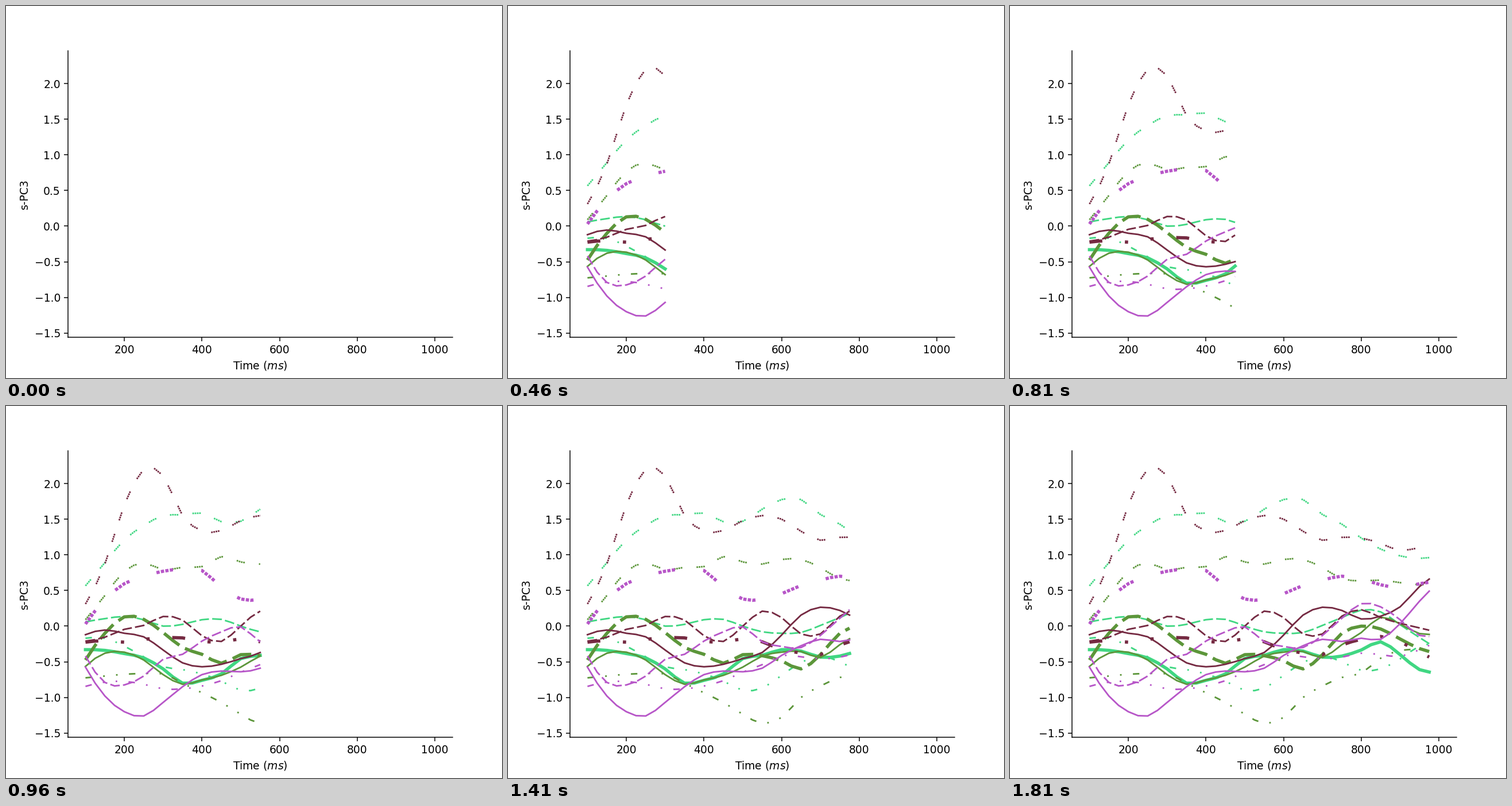
These frames come from a looping animation (864x648 px, 1860 ms). A matplotlib script:

```python
import matplotlib.pyplot as plt
import numpy as np
from matplotlib.animation import FuncAnimation

STEP = 10      # ms per animation tick
LOOP = 1860    # ms per loop
HOLD = 110     # empty axes before the first segment
GROW = 50      # ms between two samples

GREEN, OLIVE, MAROON, PURPLE = "#40d782", "#5c963a", "#752a42", "#b756c8"
SOLID = "-"
DASHED = (0, (6, 2))
DASHDOT = (0, (4, 7, 1, 7, 1, 7))
DOTTED = (0, (1, .4, 1, .4, 1, .4, 1, 8.8))

times = np.arange(100, 1001, 25)

fig, ax = plt.subplots(figsize=(6.4, 4.8), dpi=135)
ax.set_xlim(55, 1045)
ax.set_ylim(-1.556, 2.461)
ax.set_xlabel("Time ($ms$)")
ax.set_ylabel("s-PC3")
ax.spines[["top", "right"]].set_visible(False)

traces = []


def refine(knots):
    """Double the sampling rate with cubic midpoints."""
    v = np.array(knots)
    first = 3 * v[0] - 3 * v[1] + v[2]
    last = 3 * v[-1] - 3 * v[-2] + v[-3]
    p = np.r_[first, v, last]
    out = np.empty(2 * len(v) - 1)
    out[::2] = v
    out[1::2] = (9 * (p[1:-2] + p[2:-1]) - p[:-3] - p[3:]) / 16
    return out


def trace(color, style, *knots, lw=1.5):
    """Add a curve through values spaced 50 ms apart."""
    line, = ax.plot([], [], color=color, ls=style, lw=lw)
    traces.append((line, refine(knots)))


trace(GREEN, SOLID, -.33, -.34, -.385, -.445, -.6, -.80, -.76, -.67, -.455, -.41,
      -.33, -.35, -.435, -.42, -.335, -.22, -.40, -.61, -.63, lw=3)
trace(GREEN, DASHED, .06, .105, .135, .09, 0, .025, .09, .095, 0, -.08,
      -.10, -.09, .01, .12, .225, .2, .02, -.16, -.33)
trace(GREEN, DASHDOT, -.17, -.17, -.28, -.43, -.57, -.61, -.67, -.77, -.9, -.87,
      -.69, -.51, -.42, -.5, -.62, -.6, -.46, -.28, -.26)
trace(GREEN, DOTTED, .565, .89, 1.21, 1.41, 1.55, 1.56, 1.585, 1.465, 1.47, 1.64,
      1.775, 1.775, 1.565, 1.43, 1.235, 1.08, .985, .95, .99)

trace(OLIVE, SOLID, -.565, -.38, -.365, -.475, -.68, -.815, -.755, -.69, -.575, -.42,
      -.365, -.355, -.44, -.26, -.09, .125, .03, -.105, -.09)
trace(OLIVE, DASHED, -.475, -.1, .13, .095, -.09, -.3, -.395, -.52, -.4, -.415,
      -.485, -.6, -.4, -.1, 0, -.04, -.18, -.315, -.38, lw=3)
trace(OLIVE, DASHDOT, -.725, -.70, -.675, -.665, -.67, -.80, -.935, -1.07, -1.235, -1.365,
      -1.28, -1.0, -.84, -.72, -.66, -.45, -.34, -.33, -.33)
trace(OLIVE, DOTTED, .09, .43, .77, .885, .79, .825, .835, .975, .90, .87,
      .935, .935, .82, .665, .635, .645, .61, .58, .61)

trace(MAROON, SOLID, -.12, -.055, -.1, -.15, -.335, -.515, -.57, -.535, -.455, -.37,
      -.125, .155, .265, .22, .1, .14, .27, .555, .74)
trace(MAROON, DASHED, -.21, -.155, -.045, .01, .135, .085, -.135, -.215, 0, .21,
      .12, -.11, -.11, .14, .23, .12, .04, -.025, -.09)
trace(MAROON, DASHDOT, -.225, -.205, -.225, -.185, -.165, -.165, -.215, -.22, -.18, -.22,
      -.33, -.375, -.4, -.265, -.185, -.145, -.22, -.365, -.5, lw=3)
trace(MAROON, DOTTED, .31, .87, 1.70, 2.20, 2.11, 1.55, 1.335, 1.34, 1.48, 1.55,
      1.50, 1.33, 1.205, 1.245, 1.235, 1.16, 1.06, 1.10, 1.10)

trace(PURPLE, SOLID, -.575, -.98, -1.2, -1.26, -1.07, -.85, -.68, -.63, -.64, -.59,
      -.41, -.275, -.185, -.215, -.17, -.185, .035, .35, .62)
trace(PURPLE, DASHED, -.42, -.79, -.825, -.7, -.465, -.395, -.21, -.08, -.01, -.22,
      -.285, -.3, -.13, .11, .315, .27, .09, -.13, -.1)
trace(PURPLE, DASHDOT, -.845, -.785, -.775, -.815, -.88, -.88, -.84, -.765, -.645, -.54,
      -.41, -.43, -.46, -.435, -.38, -.4, -.425, -.33, -.2)
trace(PURPLE, DOTTED, .03, .37, .595, .7, .77, .80, .78, .545, .38, .375,
      .455, .57, .645, .70, .66, .58, .54, .595, .63, lw=3)


def update(i):
    t = i * STEP
    n = 0 if t < HOLD else 2 + (t - HOLD) // GROW
    for line, values in traces:
        line.set_data(times[:n], values[:n])
    return [line for line, _ in traces]


anim = FuncAnimation(fig, update, frames=LOOP // STEP, interval=STEP,
                     repeat=True, repeat_delay=0)
plt.show()
```
